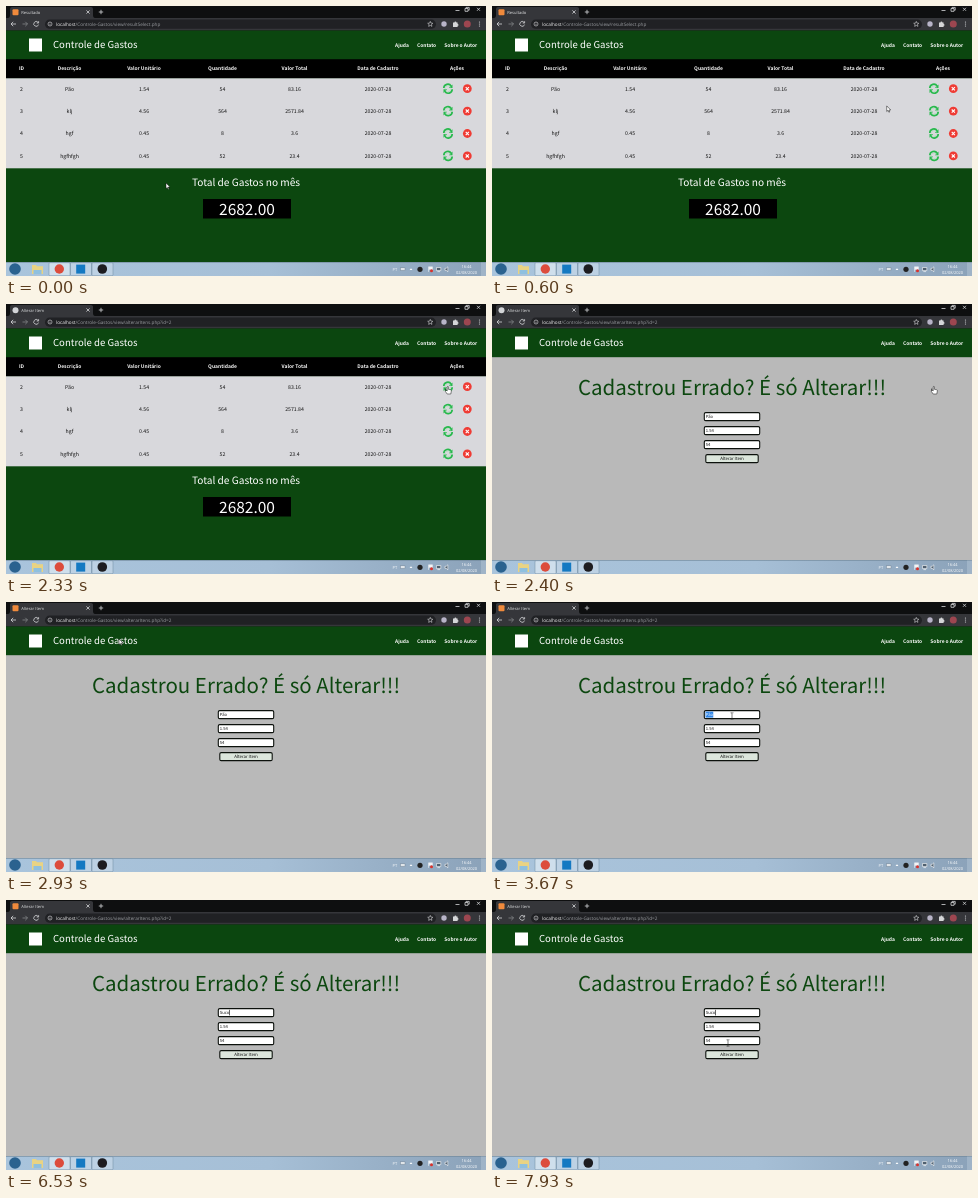
Recreate the animation shown at these times as an HTML page. Size 480x270 px, loop 8 s.

```html
<!DOCTYPE html>
<html lang="pt-BR">
<head>
<meta charset="utf-8">
<title>Controle de Gastos</title>
<style>
  html, body { margin: 0; width: 100%; height: 100%; overflow: hidden; background: #111; }
  svg { display: block; width: 100vw; height: 100vh; }
  text { font-family: "Noto Sans CJK JP", "Noto Sans CJK SC", "Noto Sans CJK", "Noto Sans", sans-serif; text-rendering: geometricPrecision; white-space: pre; }
  .ui text { font-family: "Open Sans", "Noto Sans", sans-serif; }
  .mid { text-anchor: middle; }
  .bold { font-weight: 700; }
  .line { fill: none; stroke: #d5d6d8; stroke-width: .8; }
  .field { fill: #fff; stroke: #0c110c; stroke-width: 1.1; }
</style>
</head>
<body>
<svg id="stage" viewBox="0 0 480 270" preserveAspectRatio="none">
  <defs>
    <linearGradient id="bar" x2="1" y2="0">
      <stop offset="0" stop-color="#a9c4dc"/><stop offset=".55" stop-color="#a6bfd6"/><stop offset="1" stop-color="#8ba2b9"/>
    </linearGradient>
    <g id="edit">
      <path d="M-4.2-.6A4 4 0 0 1 3.2-2.6M4.2.6A4 4 0 0 1-3.2 2.6" fill="none" stroke="#27b94c" stroke-width="1.7"/>
      <path d="M4.5-4.3V-.6H.9ZM-4.5 4.3V.6H-.9Z" fill="#27b94c"/>
      <circle r="2.9" fill="none" stroke="#8fdca2" stroke-width=".7" stroke-dasharray="1 .8"/>
    </g>
    <g id="remove">
      <circle r="4.4" fill="#ef3b34"/>
      <path d="M-1.6-1.6 1.6 1.6M1.6-1.6-1.6 1.6" stroke="#fff" stroke-width="1.1"/>
    </g>
  </defs>

  <g class="ui">
    <rect width="480" height="13" fill="#0e0f10"/>
    <path d="M2 12Q4 12 4 9V3Q4 1 6 1H85Q87 1 87 3V9Q87 12 89 12Z" fill="#35363a"/>
    <rect y="12" width="480" height="12.5" fill="#35363a"/>
    <rect id="favicon" x="6.5" y="3.2" width="6" height="6" rx="1"/>
    <text id="tab" x="15.3" y="7.8" font-size="4.1" fill="#e4e5e7"></text>
    <path class="line" d="M80.4 4.4 83.6 7.6M83.6 4.4 80.4 7.6M92.8 6H97.2M95 3.8V8.2M449.5 4.5H453.5M471 1.8 474 4.8M474 1.8 471 4.8"/>
    <path class="line" d="M459 2.5H462V5.3H459ZM460 2.3V1.4H463.2V4.2H462.2"/>
    <path class="line" d="M10 18H5M7.2 15.8 5 18 7.2 20.2"/>
    <path class="line" d="M16.5 18H21.5M19.3 15.8 21.5 18 19.3 20.2" style="stroke:#85878a"/>
    <path class="line" d="M32 16.3A2.4 2.4 0 1 0 32.5 18.6M32.6 15.2V17H30.7"/>
    <rect x="39" y="13.6" width="391" height="9.2" rx="4.6" fill="#202124"/>
    <circle class="line" cx="44" cy="18" r="2" style="stroke-width:.6"/>
    <path class="line" d="M44 17.7V19.2M44 16.7V17.1" style="stroke-width:.6"/>
    <text x="50" y="19.7" font-size="4.68" fill="#f1f1f2">localhost<tspan id="path" fill="#9b9ea2"></tspan></text>
    <path class="line" d="M424.3 15.4 425 17.1 426.9 17.3 425.5 18.5 425.9 20.4 424.3 19.4 422.7 20.4 423.1 18.5 421.7 17.3 423.6 17.1Z" style="stroke-width:.6"/>
    <circle cx="438" cy="18" r="2.7" fill="#b8b4c8"/>
    <path d="M447 16.5H448.4A1 1 0 0 1 450.4 16.5H451.6V18A.9.9 0 0 1 451.6 19.8V21H447Z" fill="#d5d6d8"/>
    <circle cx="461.3" cy="18" r="3.5" fill="#9d4650"/>
    <g fill="#d5d6d8"><circle cx="473.5" cy="16" r=".6"/><circle cx="473.5" cy="18" r=".6"/><circle cx="473.5" cy="20" r=".6"/></g>
  </g>

  <g id="list">
    <rect y="53" width="480" height="203" fill="#0c470f"/>
    <rect y="53" width="480" height="19.5" fill="#000"/>
    <rect y="72.3" width="480" height="90" fill="#d8d8dc"/>
    <g id="rows" class="mid"></g>
    <text class="mid" x="240" y="179.8" font-size="10.15" fill="#fff">Total de Gastos no mês</text>
    <rect x="197" y="193" width="88" height="19.5" fill="#000"/>
    <text class="mid" x="241" y="208.8" font-size="15.5" fill="#fff">2682.00</text>
  </g>

  <g id="form">
    <rect y="53" width="480" height="203" fill="#b9b9b9"/>
    <text class="mid" x="240" y="91.3" font-size="20.5" fill="#0c470f">Cadastrou Errado? É só Alterar!!!</text>
    <rect class="field" x="212.3" y="108.6" width="55.4" height="8" rx="1.4"/>
    <rect class="field" x="212.3" y="122.6" width="55.4" height="8" rx="1.4"/>
    <rect class="field" x="212.3" y="136.6" width="55.4" height="8" rx="1.4"/>
    <rect class="field" x="213.8" y="150.6" width="52.4" height="8" rx="1.4" style="fill:#dce6dc"/>
    <rect id="selection" x="213.5" y="109.6" height="6" fill="#2f86e8"/>
    <g font-size="4.2" fill="#111">
      <text id="item" x="213.8" y="114.1"></text>
      <text x="213.8" y="128.1">1.54</text>
      <text x="213.8" y="142.1">54</text>
      <text class="mid" x="240" y="156.1" font-size="4.33">Alterar Item</text>
    </g>
    <rect id="caret" y="109.8" width=".6" height="5.6" fill="#000"/>
  </g>

  <rect y="24.5" width="480" height="28.7" fill="#0b460f"/>
  <rect x="23" y="32.5" width="13" height="13" fill="#fff"/>
  <g fill="#fff">
    <text x="47" y="42" font-size="9.6">Controle de Gastos</text>
    <g class="bold" font-size="4.9">
      <text x="389" y="40.8">Ajuda</text><text x="411" y="40.8">Contato</text><text x="438.3" y="40.8">Sobre o Autor</text>
    </g>
  </g>

  <g class="ui">
    <rect y="256" width="480" height="14" fill="url(#bar)"/>
    <rect y="256" width="480" height=".6" fill="#6f8598"/>
    <g fill="#d6e4ef" fill-opacity=".45" stroke="#6e889f" stroke-width=".5">
      <rect x="43" y="256.7" width="21" height="13" rx="1" fill-opacity=".85"/>
      <rect x="64.5" y="256.7" width="21" height="13" rx="1"/>
      <rect x="86" y="256.7" width="21" height="13" rx="1"/>
    </g>
    <circle cx="9" cy="263" r="5.8" fill="#2a628f"/>
    <path d="M26 259H30L31 260.2H37V268H26Z" fill="#e9d383"/><rect x="27.5" y="264" width="8" height="4" fill="#8fc0df"/>
    <circle cx="53.3" cy="263" r="4.7" fill="#dc4c3c"/>
    <rect x="70.2" y="258.6" width="9" height="9" fill="#1479c2"/>
    <circle cx="96.3" cy="263" r="4.8" fill="#1d1c20"/>
    <g fill="#fff" font-size="4">
      <text x="386.5" y="264.5">PT</text>
      <text class="mid" x="460.5" y="262.2">16:44</text>
      <text class="mid" x="460.5" y="268.3">02/08/2020</text>
    </g>
    <rect x="394.5" y="261.8" width="4.5" height="2.6" fill="#e0e5e9" stroke="#66788a" stroke-width=".4"/>
    <path d="M403.6 264 405 262.3 406.4 264Z" fill="#fff"/>
    <circle cx="414" cy="263.3" r="2.6" fill="#222"/>
    <path d="M422.5 266V260.8H426.5V263.6H423" fill="#f4f4f4" stroke="#e8edf2" stroke-width=".5"/>
    <circle cx="425.5" cy="264.7" r="1.5" fill="#d9322c"/>
    <path d="M430.5 261.5H434.8V264.6H430.5ZM431.4 265.6H434M439 262.3H440.2L441.8 260.8V265.8L440.2 264.3H439Z" fill="#50606f" stroke="#fff" stroke-width=".6"/>
    <rect x="475" y="256.5" width="5" height="13.5" fill="#b4c6d6" fill-opacity=".5"/>
  </g>

  <g id="cursor">
    <path id="arrow" d="M0 0V5.6L1.3 4.4 2.2 6.4 3 6 2.2 4.1H4Z" fill="#fff" stroke="#111" stroke-width=".5"/>
    <path id="hand" d="M-.6 4.6V.6Q-.6 0 0 0T.6.6V2.9L3 3.4Q3.6 3.6 3.6 4.3L3 7.6H-.6L-2.4 5Q-2-.0-2 4.1Q-1.4 3.7-.6 4.6Z" fill="#fff" stroke="#111" stroke-width=".5"/>
    <path id="beam" d="M-1.4-3.2H-.4L0-2.8.4-3.2H1.4M0-2.8V2.8M-1.4 3.2H-.4L0 2.8.4 3.2H1.4" fill="none" stroke="#222" stroke-width=".6"/>
  </g>
</svg>

<script>
const LOOP = 8000;
const $ = id => document.getElementById(id);
const show = (id, on) => { $(id).style.display = on ? '' : 'none'; };

const columns = [15.5, 63.5, 138, 216.5, 288.5, 372, 451];
const headings = ['ID', 'Descrição', 'Valor Unitário', 'Quantidade', 'Valor Total', 'Data de Cadastro', 'Ações'];
const items = [
  ['2', 'Pão', '1.54', '54', '83.16'],
  ['3', 'klj', '4.56', '564', '2571.84'],
  ['4', 'hgf', '0.45', '8', '3.6'],
  ['5', 'hgfhfgh', '0.45', '52', '23.4']
];
const cells = (row, y, style) => row.map((label, i) =>
  `<text x="${columns[i]}" y="${y}" ${style}>${label}</text>`).join('');

$('rows').innerHTML = cells(headings, 64, 'class="bold" font-size="4.95" fill="#fff"') +
  items.map((item, i) => {
    const y = 82.7 + i * 22.4;
    return cells([...item, '2020-07-28'], y + 1.9, 'font-size="5.2" fill="#111"') +
      `<use href="#edit" x="442" y="${y}"/><use href="#remove" x="461.3" y="${y}"/>`;
  }).join('');

// Pointer stops: time, x, y
const track = [
  [0, 160, 177], [70, 160, 177], [300, 254, 150], [560, 385, 104], [800, 441.8, 80],
  [1670, 441.8, 80], [1730, 441.6, 81.4], [1930, 441.8, 82.4],
  [2420, 441.8, 82.4], [2700, 270, 55], [2930, 113, 37],
  [3050, 113, 37], [3300, 180, 84], [3530, 240, 114],
  [3910, 240, 114], [4000, 239, 113.3],
  [7450, 239, 113.3], [7600, 252, 111], [7700, 263, 126], [7810, 250, 146], [7930, 236, 143]
];
// Field contents: time, text, caret
const typing = [
  [0, 'Pão', 0], [5000, '', 1], [5330, 'S', 1], [5470, 'Su', 1], [6000, 'Su', 0],
  [6270, 'Suc', 1], [6470, 'Suco', 1], [7000, 'Suco', 0], [7530, 'Suco', 1]
];
const shapes = [[0, 'arrow'], [740, 'hand'], [2470, 'arrow'], [3450, 'beam'], [5330, ''], [7470, 'beam']];
const at = (steps, t) => steps.findLast(step => step[0] <= t);

function pointer(t) {
  const next = track.findIndex(stop => stop[0] > t);
  if (next < 0) return track.at(-1).slice(1);
  const [a, b] = [track[next - 1], track[next]];
  const k = (t - a[0]) / (b[0] - a[0]);
  return [a[1] + (b[1] - a[1]) * k, a[2] + (b[2] - a[2]) * k];
}

function draw(t) {
  const loaded = t >= 2270, editing = t >= 2400;
  show('list', !editing);
  show('form', editing);
  $('tab').textContent = loaded ? 'Alterar Item' : 'Resultado';
  $('path').textContent = '/Controle-Gastos/view/' + (loaded ? 'alterarItens.php?id=2' : 'resultSelect.php');
  const waiting = loaded && t < 2530;
  $('favicon').setAttribute('rx', waiting ? 3 : 1);
  $('favicon').setAttribute('fill', waiting ? '#d2d4d7' : '#f08a3c');

  const [, value, caret] = at(typing, t);
  const selected = t >= 3670 && t < 5000;
  const item = $('item');
  item.textContent = value || 'Descrição';
  item.setAttribute('fill', selected ? '#fff' : value ? '#111' : '#777');
  const width = editing ? item.getComputedTextLength() : 0;
  show('selection', selected);
  $('selection').setAttribute('width', width + .4);
  show('caret', caret);
  $('caret').setAttribute('x', 213.5 + (value ? width + .2 : 0));

  const shape = at(shapes, t)[1];
  for (const id of ['arrow', 'hand', 'beam']) show(id, id === shape);
  $('cursor').setAttribute('transform', `translate(${pointer(t)})`);
}

const start = performance.now();
function tick() {
  draw((performance.now() - start) % LOOP);
  requestAnimationFrame(tick);
}
tick();
</script>
</body>
</html>
```
